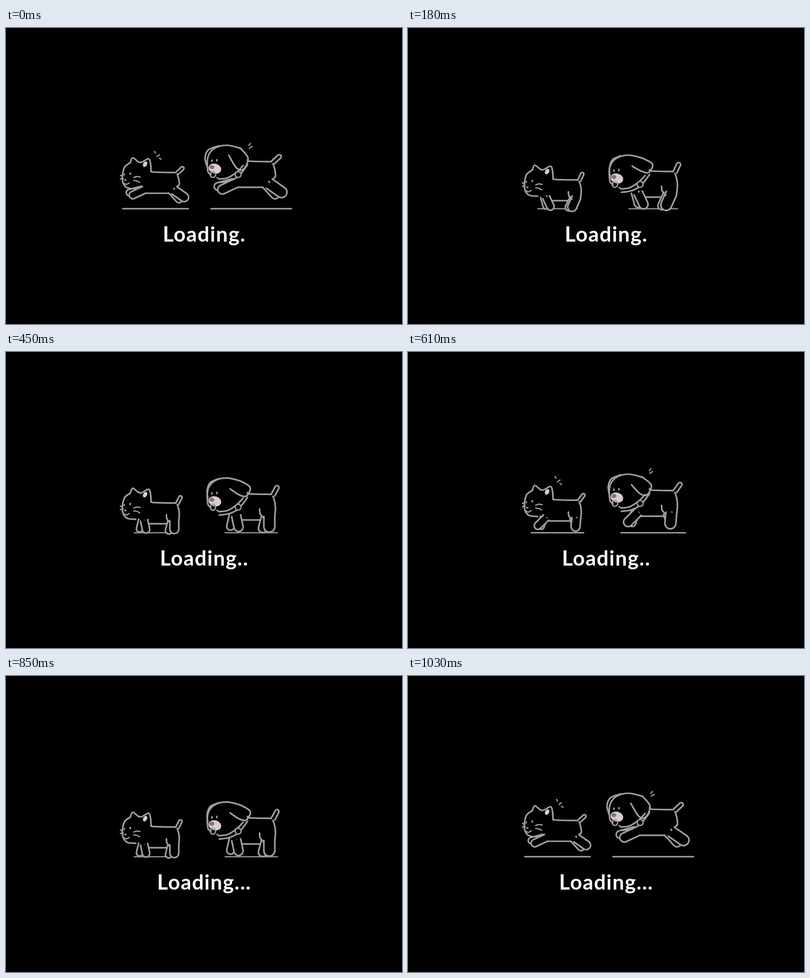
An HTML page with a canvas for the animation above (1.06 s loop, 800x600 px).

```html
<!DOCTYPE html>
<html lang="en">
<head>
<meta charset="utf-8">
<title>Loading</title>
<style>
html, body { margin: 0; width: 100%; height: 100%; overflow: hidden; background: #000; }
canvas { display: block; }
</style>
</head>
<body>
<canvas id="stage" width="800" height="600"></canvas>
<script>
const ctx = document.getElementById('stage').getContext('2d');
const INK = '#a0a0a0', PINK = '#dbcbcc', GROUND = 366.3;
const LOOP = 1060, TICK = 30, REST = 70;

// Key poses of one stride; leg angles in degrees, forward is positive.
const KEYS = [
  { step: 0, lift: 1, front: 65, frontFar: 75, hind: -55, hindFar: -42 },
  { step: 4, lift: .12, front: -12, frontFar: 13, hind: 0, hindFar: 15 },
  { step: 6, lift: 0, front: -25, frontFar: -15, hind: 24, hindFar: 26 },
  { step: 7, lift: .5, front: 45, frontFar: 15, hind: 5, hindFar: -15 },
  { step: 10, lift: 1, front: 65, frontFar: 75, hind: -55, hindFar: -42 }
];

// Measures while fully airborne; drop is the fall to the lowest pose.
const CAT = { size: 1, neck: 293, shoulder: 279, hip: 340, back: 292, drop: 15, mid: 302, head: catHead };
const DOG = { size: 1.23, neck: 488, shoulder: 465, hip: 532, back: 270, drop: 20, mid: 495.5, head: dogHead };

function poseAt(step) {
  const i = Math.max(1, KEYS.findIndex(k => k.step >= step));
  const a = KEYS[i - 1], b = KEYS[i], k = (step - a.step) / (b.step - a.step);
  const pose = {};
  for (const name in a) pose[name] = a[name] + (b[name] - a[name]) * k;
  return pose;
}

// Smooth line through x,y pairs
function curve(...p) {
  const last = p.length / 2 - 1;
  const at = i => { const j = Math.max(0, Math.min(last, i)) * 2; return [p[j], p[j + 1]]; };
  ctx.beginPath();
  ctx.moveTo(p[0], p[1]);
  for (let i = 0; i < last; i++) {
    const [a, b, c, d] = [at(i - 1), at(i), at(i + 1), at(i + 2)];
    ctx.bezierCurveTo(b[0] + (c[0] - a[0]) / 6, b[1] + (c[1] - a[1]) / 6,
      c[0] - (d[0] - b[0]) / 6, c[1] - (d[1] - b[1]) / 6, c[0], c[1]);
  }
  ctx.stroke();
}

function oval(x, y, rx, ry, color, turn = 0) {
  ctx.beginPath();
  ctx.ellipse(x, y, rx, ry, turn, 0, Math.PI * 2);
  if (color) { ctx.fillStyle = color; ctx.fill(); } else ctx.stroke();
}

// Round-ended limb, open at the joint
function limb(x, y, angle, length, r) {
  ctx.save();
  ctx.translate(x, y);
  ctx.rotate(angle);
  ctx.beginPath();
  ctx.moveTo(r, 0);
  ctx.lineTo(r, length);
  ctx.arc(0, length, r, 0, Math.PI);
  ctx.lineTo(-r, 0);
  ctx.fillStyle = '#000';
  ctx.fill();
  ctx.stroke();
  ctx.restore();
}

function leg(x, y, degrees, r, s) {
  const a = degrees * Math.PI / 180;
  limb(x, y, a, (17 + 9 * Math.abs(Math.sin(a))) * s, r * s);
}

function animal(a, pose) {
  const s = a.size, fall = (1 - pose.lift) * a.drop, top = a.back + fall;
  const { shoulder, hip } = a;
  const bend = pose.hind * Math.PI / 180, hipY = top + 37 * s;

  ctx.lineWidth = 2.2 + pose.lift * .9;
  const half = (40 + 26 * pose.lift) * s;
  curve(a.mid - half, GROUND, a.mid + half, GROUND);

  ctx.lineWidth = 3.2;
  curve(shoulder + 4 * s, top + 43 * s, hip - 11 * s, top + 43 * s);
  leg(shoulder - 5 * s, top + 35 * s, pose.frontFar, 6.3, s);
  leg(hip - 6 * s, top + 38 * s, pose.hindFar, 7, s);
  leg(shoulder, top + 36 * s, pose.front, 7.5, s);
  leg(hip, hipY, pose.hind, 9, s);
  if (pose.lift < .7) {
    curve(hip - 16 * s, hipY - 12 * s, hip - 15 * s, hipY - 4 * s, hip - 9 * s, hipY + 3 * s);
  }
  curve(hip + 6 * s, top + 4 * s, hip + 9 * s, top + 14 * s, hip + 10 * s, top + 25 * s,
    hip + 9 * s * Math.cos(bend), hipY + 9 * s * Math.sin(bend));
  limb(hip + 6 * s, top + 2 * s, (205 + 22 * pose.lift) * Math.PI / 180, 14 * s, 3.3 * s);
  curve(a.neck, top - 3, a.neck + 5, top, hip + 3 * s, top + 1);

  ctx.save();
  ctx.translate(0, fall);
  a.head(1 - pose.lift);
  ctx.restore();
}

function catHead() {
  oval(281, 276, 4, 6, PINK, .5);
  curve(251, 273, 256, 263, 267, 271, 274, 272, 288, 265, 292, 275, 293, 289);
  curve(251, 273, 239, 283, 235, 307, 243, 323, 262, 326);
  oval(251, 295, 1.8, 2.6, INK);
  oval(239, 297, 1.5, 2.4, INK);
  oval(241, 308, 2.6, 1.8, INK);
  ctx.lineWidth = 2.4;
  curve(239, 315, 243, 317, 249, 314);
  curve(258, 303, 264, 301, 271, 302);
  curve(258, 309, 265, 310, 270, 313);
  curve(231, 299, 236, 300);
  curve(231, 306, 237, 305);
}

function dogHead(flap) {
  oval(422, 285, 13, 10, PINK, .3);
  oval(416, 282, 5, 4, '#7c7676');
  // crown, far ear, near ear
  curve(474, 244, 450, 238, 430, 240, 414, 250, 407, 266, 408, 291, 414, 297);
  curve(430, 239, 409 + 4 * flap, 247, 402 + 5 * flap, 263, 406 + 2 * flap, 280);
  curve(474, 244, 489 + 5 * flap, 264 - 8 * flap, 480 + 6 * flap, 286 - 13 * flap,
    466 + 5 * flap, 284 - 14 * flap, 450 + 3 * flap, 258 + 2 * flap);
  oval(416, 269, 1.7, 2.8, INK);
  oval(426, 268, 1.7, 2.8, INK);
  // collar with tag
  curve(430, 306, 447, 304, 465, 293, 479, 279);
  curve(431, 313, 451, 310, 470, 300, 488, 277);
  ctx.lineWidth = 2.6;
  oval(469, 297, 6, 6, '#000');
  oval(469, 297, 6, 6);
  oval(418, 297, 5.5, 6);
  curve(426, 303, 430, 306);
}

function marks(lift) {
  ctx.save();
  ctx.translate(-6 * (1 - lift), 5 * (1 - lift));
  ctx.lineWidth = 2.4;
  curve(300, 250, 302, 253.5);
  curve(305, 260.5, 310, 257);
  curve(310, 264, 313.5, 266);
  curve(490.5, 238, 494, 234);
  curve(491.5, 243.5, 497, 240);
  ctx.restore();
}

function frame(now) {
  const t = now % LOOP;
  const lap = t < 330 ? 0 : t < 730 ? 1 : 2;
  let u = t - [0, 330, 730][lap];
  // the middle stride rests on the standing pose
  if (lap === 1 && u >= 5 * TICK) u = Math.max(5 * TICK - 1, u - REST);
  const pose = poseAt(Math.min(10, Math.floor(u / TICK)));

  ctx.fillStyle = '#000';
  ctx.fillRect(0, 0, 800, 600);
  ctx.strokeStyle = INK;
  ctx.lineCap = ctx.lineJoin = 'round';
  animal(CAT, pose);
  animal(DOG, pose);
  if (pose.lift > .45) marks(pose.lift);

  ctx.fillStyle = '#fff';
  ctx.font = '700 42px Lato, "Open Sans", sans-serif';
  ctx.letterSpacing = '1.4px';
  ctx.textAlign = 'center';
  ctx.fillText('Loading' + '.'.repeat(lap + 1), 400.5, 433);
  requestAnimationFrame(frame);
}
requestAnimationFrame(frame);
</script>
</body>
</html>
```
